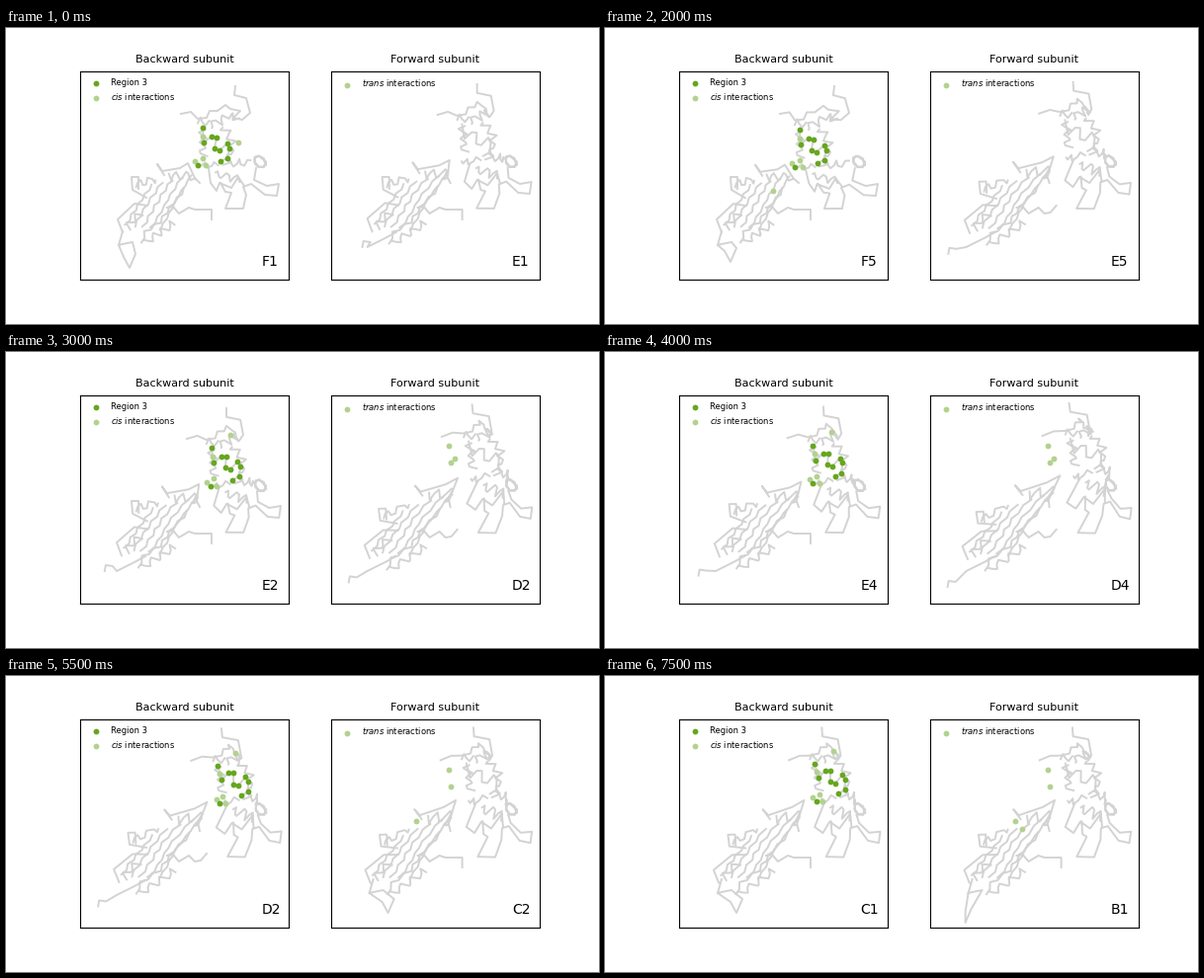
Animation, 600 px wide and 300 px high, one loop 8 s. Source, as a matplotlib script:

```python
import numpy as np
import matplotlib.pyplot as plt
from matplotlib.animation import FuncAnimation

W, H, DPI = 600, 300, 100
STEPS, INTERVAL = 16, 500
GREEN, LIGHT, GREY = "#66a61e", "#b2d28e", "lightgray"
LEFT_X, RIGHT_X, TOP_Y = 75.0, 328.6, 44.3
BOX_W, BOX_H = 211.4, 210.7
LAG = 5  # the forward subunit runs five poses ahead

plt.rcParams["font.family"] = "DejaVu Sans"
plt.rcParams["mathtext.fontset"] = "dejavusans"
rng = np.random.default_rng(4)


def pts(text):
    """Parse 'x,y x,y ...' into an (n, 2) array."""
    return np.array([p.split(",") for p in text.split()], float)


def ramp(pose, start, end):
    return np.clip((pose - start) / (end - start), 0, 1)


def trace(guide, rise, radius, turn):
    """Residues along a guide line, winding round it by `turn` per residue."""
    run = np.r_[0, np.hypot(*np.diff(guide, axis=0).T).cumsum()]
    s = np.linspace(0, run[-1], max(int(run[-1] / rise), 2) + 1)
    line = np.column_stack([np.interp(s, run, c) for c in guide.T])
    tangent = np.gradient(line, axis=0)
    tangent /= np.hypot(*tangent.T)[:, None]
    normal = tangent[:, ::-1] * [-1, 1]
    wave = radius * np.cos(turn * np.arange(len(s)) + rng.uniform(0, 6))
    return line + normal * wave[:, None] + rng.normal(0, radius / 5, line.shape)


def helix(text):
    return trace(pts(text), 2.7, 4, np.radians(100))


def strand(guide):
    return trace(guide, 6, 1.3, np.pi)


# Backbone at rest: loops drawn directly, helices and strands by rule
REGION = pts("199,101 200,116 208,110 213,111 211,122 216,124 224,117 226,122 224,132 217,135 194,139")
LOOPS = [
    "232,59 231,68 243,71 247,86 239,93 230,91 237,84 227,82 222,78 214,84 206,84 203,91 194,92 187,85 177,87",
    "217,157 222,166 228,167 222,183 240,183 243,169 240,161 248,158 262,169 274,170 276,158 264,160 251,154 253,142",
    "196,157 191,152 184,137 176,142 158,145 153,138 160,149",
    "205,142 207,157 213,165 216,157 228,162 235,151 241,160",
    "142,172 128,164 127,151 134,151 134,163",
    "143,180 130,178 113,194 118,207",
]
HELICES = [
    "194,94 205,95", "206,99 224,88 235,91", "199,103 199,130",
    "221,100 229,118 224,140", "194,137 214,140", "224,136 247,137",
    "211,147 236,153", "130,158 152,154", "164,149 190,150",
    "122,202 136,187", "143,217 158,206 170,198",
]
angle = np.linspace(0, 4 * np.pi, 15)
ring = np.column_stack([257 + 6 * np.cos(angle), 135.5 + 6 * np.sin(1.05 * angle)])
sheet = [strand(np.array([(148 + 39 * t, 159 - 10 * t), (133 + 41 * t, 180 - 8 * t),
                          (121 + 35 * t, 200 + 4 * t)])) for t in np.linspace(0, 1, 5)]
CHAINS = [pts(s) for s in LOOPS] + [helix(s) for s in HELICES] + sheet
CHAINS += [REGION[:-1], ring, strand(pts("138,218 140,207 155,197 166,182 181,163"))]

# Landmarks: rest x, y, shift on opening, further shift on swinging
MARKS = np.array([
    (232, 59, -9, -2, -7, -5), (177, 87, 6, 1, 6, -3), (247, 86, -7, -2, -3, -4),
    (276, 158, 2, -2, 1, 2), (232, 183, 0, 0, 2, 1), (127, 152, 0, 0, -5, 11),
    (114, 193, -1, -1, -4, 4), (140, 220, -3, 1, -3, 3),
    (258, 135, 0, 0, 0, 0), (196, 157, 0, 0, 0, 0), (165, 182, 0, 0, 0, 0),
])
ANCHORS = np.vstack([REGION, MARKS[:, :2]])
PIVOT = REGION.mean(0)

CONTACTS = pts("199,110 191,135 199,132 202,139")
EDGE, STRAY, CROWN = pts("235,116 170,165 221,88")[:, None]
TRANS = pts("194,95 200,108 196,112 161,147 168,155")


def swing(pose):
    """Swing of the upper domain in x and y: out, then partly back."""
    return ramp(pose, 6, 13) - np.array([.48, .1]) * ramp(pose, 13, 15)


def shifts(pose):
    opened, out = float(pose >= LAG), swing(pose)
    # Region 3 turns as one body while it moves up and right
    x, y = (REGION - PIVOT).T
    turn = .1 * (opened + out.mean()) * np.column_stack([y, -x])
    drift = (1 - opened) * pose * np.array([-.55, .45])
    core = turn + drift + opened * np.array([10.8, -4.8]) + out * [11.3, -11]
    return np.vstack([core, opened * MARKS[:, 2:4] + out * MARKS[:, 4:]])


def warp(line, shift):
    """Move points by the inverse-distance mean of the anchor shifts."""
    w = (((line[:, None] - ANCHORS) ** 2).sum(2) + .5) ** -1.5
    return line + w @ shift / w.sum(1, keepdims=True)


def tail(pose):
    """Lower-left end: a loop at first and last, stretched out in between."""
    if LAG <= pose < 15:
        x, y = 93 + 14 * np.exp((LAG - pose) / 1.4), 222 + 16 * ramp(pose, 6, 13)
        return [(141, 207), (130, 213), (122, 217), (112, 222), (x + 8, y - 5), (x + 1, y - 6), (x, y)]
    last = ramp(pose, 19, 20)
    x, y = (125 + pose / 2, 243 - 1.5 * pose) if pose < LAG else (133 - 22 * last, 240 + 10 * last)
    return [(118, 206), (114, 220), (max(x - 6, 111), y - 11), (x, y),
            (x + 6, y - 14), (128, 217), (118, 219), (114, 220)]


def stub(pose):
    end = "191,188 197,187 203,180" if 8 < pose < 14 else "191,184 208,184 208,194"
    return pts("163,182 169,181 175,188 185,182 " + end)


def label(pose):
    return "FEDCB"[pose // 5] + str(pose % 5 + 1)


class Panel:
    def __init__(self, fig, x, title):
        self.ax = fig.add_axes([x / W, 1 - (TOP_Y + BOX_H) / H, BOX_W / W, BOX_H / H])
        self.ax.set(xlim=(LEFT_X, LEFT_X + BOX_W), ylim=(TOP_Y + BOX_H, TOP_Y), xticks=[], yticks=[])
        self.ax.set_title(title, fontsize=8, pad=6.7)
        self.chain, = self.ax.plot([], [], color=GREY, lw=1.4)
        self.light, self.dark = self.dots(LIGHT), self.dots(GREEN)
        self.name = self.ax.text(258.4, 241, "", fontsize=10)

    def dots(self, color, x=(), y=()):
        return self.ax.plot(x, y, "o", color=color, ms=4.2, mew=0)[0]

    def legend(self, y, color, text):
        self.dots(color, [91], [y])
        self.ax.text(106, y + 1.4, text, fontsize=6)

    def show(self, pose):
        shift = shifts(pose)
        lines = [warp(c, shift) for c in CHAINS] + [tail(pose), stub(pose)]
        gap = [(np.nan, np.nan)]
        self.chain.set_data(*np.vstack([np.vstack([ln, gap]) for ln in lines]).T)
        self.name.set_text(label(pose))
        return shift


fig = plt.figure(figsize=(W / DPI, H / DPI), dpi=DPI)
back = Panel(fig, LEFT_X, "Backward subunit")
back.legend(56.3, GREEN, "Region 3")
back.legend(71.3, LIGHT, "$cis$ interactions")
fore = Panel(fig, RIGHT_X, "Forward subunit")
fore.legend(58, LIGHT, "$trans$ interactions")


def trans(pose):
    if pose < 10:
        return TRANS[:0]
    return TRANS[:3] if pose < 16 else TRANS[[0, 2, 3, 4][:3 + (pose >= 20)]]


def update(i):
    shift = back.show(i)
    extra = EDGE if i == 0 else STRAY if i < LAG else CROWN
    back.light.set_data(*warp(np.vstack([CONTACTS, extra]), shift).T)
    back.dark.set_data(*(REGION + shift[:len(REGION)]).T)
    fore.show(i + LAG)
    fore.light.set_data(*trans(i + LAG).T)


anim = FuncAnimation(fig, update, frames=STEPS, interval=INTERVAL, repeat=True, repeat_delay=0)
plt.show()
```
